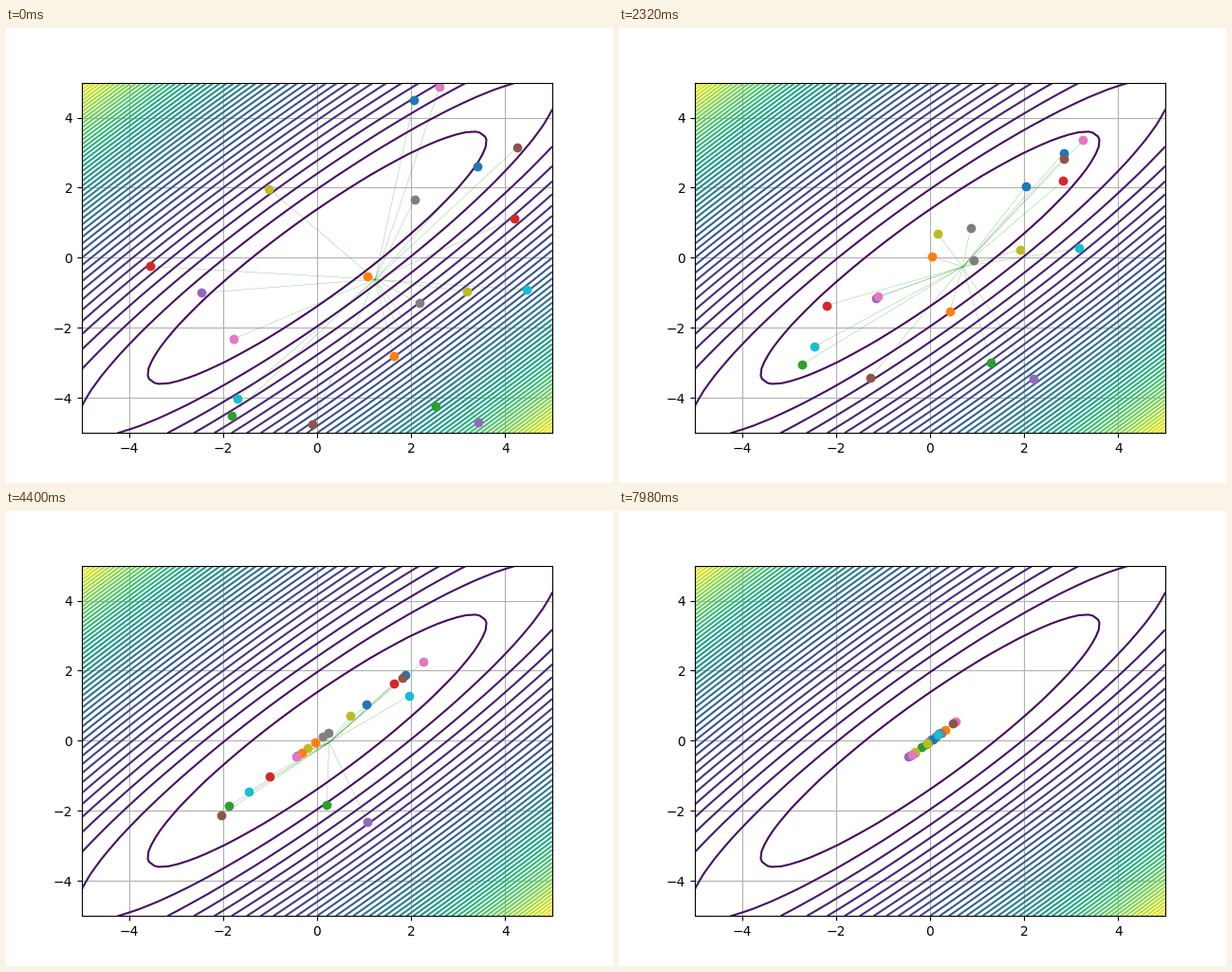
A matplotlib script that plays this animation: 640x480 px, repeating every 8000 ms.

```python
import numpy as np
import matplotlib.pyplot as plt
from matplotlib.animation import FuncAnimation
from matplotlib.collections import LineCollection

INTERVAL = 20      # ms per frame
FRAMES = 400
PACE = 0.0153      # distance covered in one frame
SOFTEN = 0.01      # slows the last steps to a stop

STARTS = np.array([
    (2.06, 4.49), (1.07, -0.53), (-1.82, -4.51), (-3.54, -0.24), (-2.45, -1.0),
    (-0.11, -4.74), (2.61, 4.89), (2.07, 1.67), (-1.02, 1.97), (-1.7, -4.01),
    (3.41, 2.62), (1.63, -2.79), (2.52, -4.24), (4.2, 1.13), (3.43, -4.7),
    (4.26, 3.16), (-1.78, -2.32), (2.17, -1.3), (3.19, -0.96), (4.45, -0.92),
])


def bowl(x, y):
    return 0.26 * (x**2 + y**2) - 0.48 * x * y


def slope(p):
    return 0.52 * p - 0.48 * p[:, ::-1]


def descend(start):
    """Walk downhill at an even pace; each walker rests at its own valley spot."""
    rng = np.random.default_rng(4)
    rest = rng.normal(0, 0.2, (len(start), 1))
    path = [start, start]
    while len(path) < FRAMES:
        g = slope(path[-1] - rest)
        size = np.hypot(g[:, :1], g[:, 1:])
        path.append(path[-1] - PACE * g / (size + SOFTEN))
    return path


fig, ax = plt.subplots(figsize=(6.4, 4.8), dpi=100)
axis = np.linspace(-5, 5, 50)
X, Y = np.meshgrid(axis, axis)
ax.contour(X, Y, bowl(X, Y), 50)
ax.set(xlim=(-5, 5), ylim=(-5, 5))
ax.grid(True)

spokes = LineCollection([], colors="g", linewidths=0.2, linestyles="--", zorder=2)
ax.add_collection(spokes, autolim=False)
dots = [ax.plot([], [], "o", color=f"C{i % 10}")[0] for i in range(len(STARTS))]
path = descend(STARTS)


def update(i):
    centre = path[i].mean(axis=0)
    spokes.set_segments([[p, centre] for p in path[i]])
    for dot, (x, y) in zip(dots, path[i]):
        dot.set_data([x], [y])
    return [spokes, *dots]


anim = FuncAnimation(fig, update, frames=FRAMES, interval=INTERVAL,
                     blit=True, repeat=True, repeat_delay=0)
plt.show()
```
